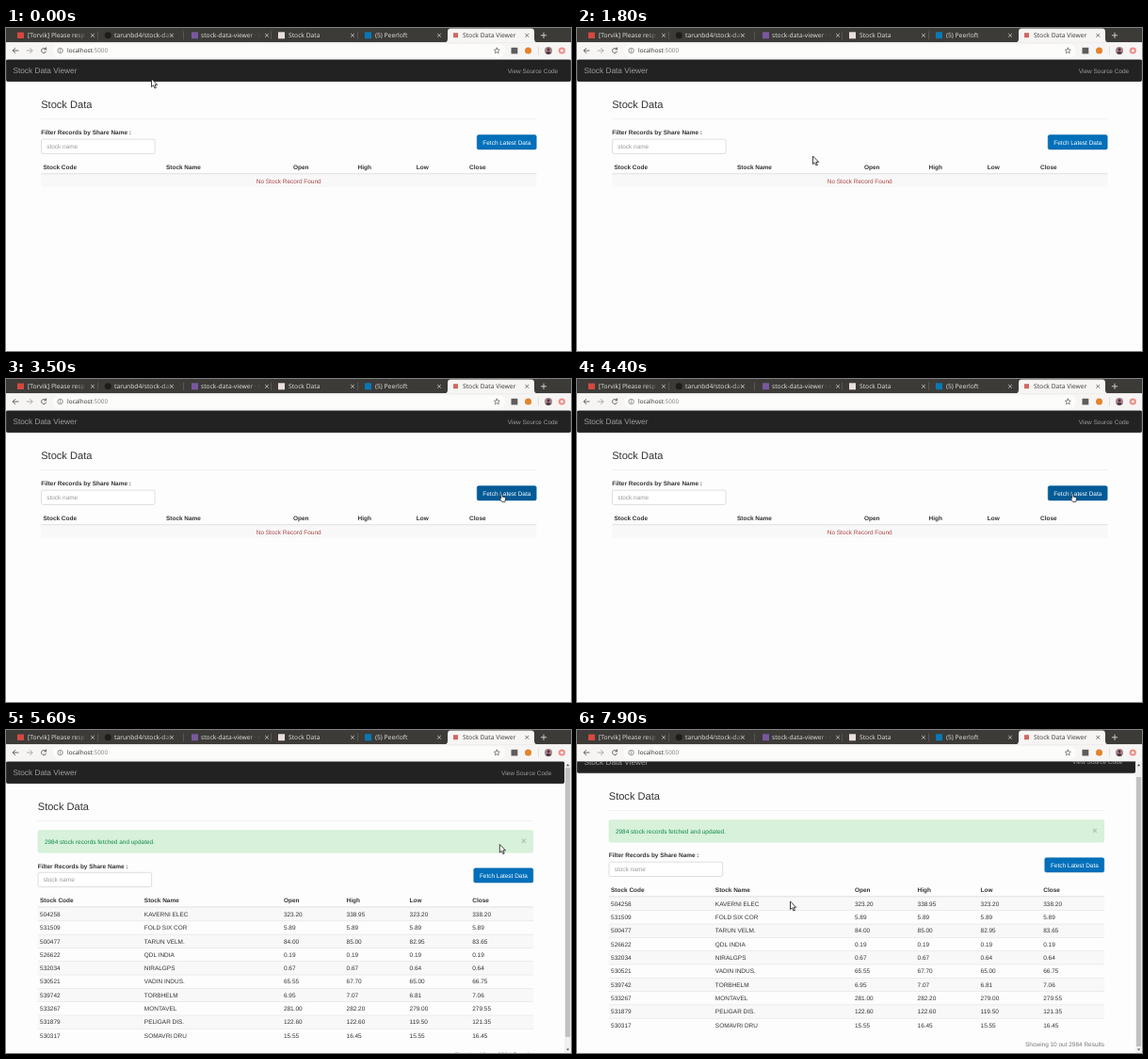
An HTML page for the animation above (8 s loop, 600x343 px).

```html
<!DOCTYPE html>
<html lang="en">
<head>
<meta charset="utf-8">
<title>Stock Data Viewer</title>
<style>
html, body { margin: 0; width: 100%; height: 100%; overflow: hidden; background: #fdfdfd; }
svg { display: block; width: 600px; height: 343px; }
text { font-family: "Liberation Sans", Arial, sans-serif; font-size: 6.46px; fill: #333; text-rendering: geometricPrecision; white-space: pre; }
.ui { font-family: "Noto Sans", "Open Sans", sans-serif; font-size: 6.7px; fill: #dcdad5; }
.b { font-weight: bold; }
.line { fill: none; stroke-linecap: round; stroke-linejoin: round; }
</style>
</head>
<body>
<svg id="stage" viewBox="0 0 600 343" xmlns="http://www.w3.org/2000/svg">
  <defs>
    <linearGradient id="fade"><stop offset="0" stop-color="#3c3b37" stop-opacity="0"/><stop offset="1" stop-color="#3c3b37"/></linearGradient>
    <clipPath id="view"><rect y="33.2" width="600" height="310"/></clipPath>
  </defs>
  <rect width="600" height="343" fill="#fdfdfd"/>
  <g clip-path="url(#view)">
    <g id="page">
      <g id="nav"></g>
      <g id="body">
        <g id="head"></g>
        <g id="alert"></g>
        <g id="main">
          <g id="form"></g>
          <g id="empty"></g>
          <g id="full"></g>
        </g>
      </g>
    </g>
    <g id="bar"></g>
  </g>
  <g id="chrome"></g>
  <g id="arrow"><path d="M0 0V8.6L2 6.8L3.5 10L4.9 9.4L3.5 6.3H6.2Z" fill="#fff" stroke="#111" stroke-width=".8" stroke-linejoin="round"/></g>
  <g id="hand"><path d="M1.4 .6Q2.2 -.2 2.8 .8V3.4L5.6 4Q6.4 4.3 6.3 5.2L5.6 8.8H2.3L.2 5.9Q-.1 5 .8 5L1.4 5.5Z" fill="#fff" stroke="#111" stroke-width=".7" stroke-linejoin="round"/></g>
</svg>
<script>
const $ = id => document.getElementById(id);
const text = (x, y, s, attrs = "") => `<text x="${x}" y="${y}" ${attrs}>${s}</text>`;
const rect = (x, y, w, h, fill, attrs = "") => `<rect x="${x}" y="${y}" width="${w}" height="${h}" fill="${fill}" ${attrs}/>`;
const dot = (x, y, r, fill) => `<circle cx="${x}" cy="${y}" r="${r}" fill="${fill}"/>`;
const line = (d, color, w = 1) => `<path class="line" d="${d}" stroke="${color}" stroke-width="${w}"/>`;
const cross = (x, y, r, color) => line(`M${x - r} ${y - r}l${2 * r} ${2 * r}m0 ${-2 * r}l${-2 * r} ${2 * r}`, color, .8);

const LEFT = 37.2, WIDTH = 526.2, ROW = 14.31, TOP = 155.3;
const ALERT_H = 33.2, SCROLL = 11.1, BAR_W = 6.9;

function drawChrome() {
  const tabs = [
    [23, "[Torvik] Please resp", 92, 97],
    [115, "tarunbd4/stock-data", 176, 188],
    [207, "stock-data-viewer · H", 277, 281],
    [300, "Stock Data", 368, 373],
    [392, "(5) Peerloft", 460, 0]
  ];
  let s = rect(0, 0, 600, 15.4, "#3c3b37") + rect(0, 15.2, 600, 18, "#f6f5f4");
  for (const [x, title, close, sep] of tabs) {
    s += text(x, 10.3, title, 'class="ui"');
    if (x < 300) s += rect(x + 50, 2, 13, 11, "url(#fade)") + rect(x + 63, 2, 18, 11, "#3c3b37");
    s += cross(close, 7.8, 1.6, "#d0cec9");
    if (sep) s += rect(sep, 3.5, .6, 8.5, "#6b6a65");
  }
  s += `<path d="M465 15.4Q469 15.4 469 11.5V4Q469 .6 472.4 .6H557.6Q561 .6 561 4V11.5Q561 15.4 565 15.4Z" fill="#f6f5f4"/>`;
  s += text(485, 10.3, "Stock Data Viewer", 'class="ui" style="fill:#45443f"') + cross(553.3, 7.8, 1.6, "#55544f");
  s += line("M568.3 7.8h5.4M571 5.1v5.4", "#dcdad5", .9);
  // Tab icons
  s += rect(12, 4.6, 7, 6.4, "#d5483f") + dot(108.3, 7.8, 3.5, "#1c1c1b") + rect(197, 4.3, 7, 7, "#79589f");
  s += rect(289, 4.3, 7, 7, "#e9dfdf") + rect(381, 4.3, 7, 7, "#0a78b5") + rect(475, 5.2, 5, 5, "#cf6760");
  // Toolbar
  s += rect(50, 17.2, 480, 14, "#fcfcfb", 'rx="7"');
  s += line("M13 24H7.4M9.8 21.4L7.2 24L9.8 26.6", "#55544f", .9);
  s += line("M22.3 24H27.9M25.5 21.4L28.1 24L25.5 26.6", "#a5a4a0", .9);
  s += line("M42.3 22.4A2.6 2.6 0 1 0 42.6 25M42.6 20.9V22.8H40.7", "#55544f", .9);
  s += `<circle cx="57.6" cy="24" r="2.7" fill="none" stroke="#66655f" stroke-width=".7"/>` + line("M57.6 23.8V25.3M57.6 22.5V22.6", "#66655f", .7);
  s += `<text class="ui" x="65" y="26.3" style="font-size:6.35px;fill:#333">localhost<tspan fill="#85847f">:5000</tspan></text>`;
  const star = Array.from({ length: 10 }, (_, i) => {
    const a = i * Math.PI / 5, r = i % 2 ? 1.5 : 3.1;
    return (521.3 + r * Math.sin(a)).toFixed(2) + " " + (24.2 - r * Math.cos(a)).toFixed(2);
  });
  s += line("M" + star.join("L") + "Z", "#55544f", .7);
  s += rect(536.5, 20.8, 6.8, 6.6, "#5d5d5d") + dot(554.5, 24, 3.5, "#e5822d") + rect(565.4, 19.5, .6, 9, "#d3d1cd");
  s += dot(576, 24, 4, "#a98288") + `<path d="M573 26.6Q576 22.8 579 26.6A4 4 0 0 1 573 26.6Z" fill="#4d3540"/>` + dot(576, 22.8, 1.5, "#4d3540");
  s += dot(590.3, 24, 3.6, "#ee8d88") + dot(590.3, 24, 1.6, "#fbeeee");
  $("chrome").innerHTML = s;
}

function drawHeader(cols) {
  const names = ["Stock Code", "Stock Name", "Open", "High", "Low", "Close"];
  return names.map((n, i) => text(cols[i], 150, n, 'class="b"')).join("") + rect(LEFT, 154.3, WIDTH, .95, "#ddd");
}

function drawPage() {
  $("nav").innerHTML = `<rect id="navbox" x=".2" y="33.4" height="23.3" rx="1.85" fill="#222" stroke="#080808" stroke-width=".5"/>`
    + text(7.4, 48, "Stock Data Viewer", 'style="font-size:8.31px;fill:#9d9d9d"')
    + text(586.2, 47.6, "View Source Code", 'id="link" text-anchor="end" style="fill:#9d9d9d"');
  $("head").innerHTML = text(LEFT, 85.2, "Stock Data", 'style="font-size:11.08px"') + rect(LEFT, 96.4, WIDTH, .6, "#e9e9e9");
  $("alert").innerHTML = rect(LEFT + .2, 106.6, WIDTH - .4, 23.7, "#d7f1da", 'rx="1.85" stroke="#cdebcf" stroke-width=".45"')
    + text(44.4, 120.8, "2984 stock records fetched and updated.", 'style="fill:#128a4a"')
    + text(553.4, 121.2, "×", 'class="b" text-anchor="middle" style="font-size:9.7px;fill:#abc3ae"');
  $("form").innerHTML = text(LEFT, 113.4, "Filter Records by Share Name :", 'class="b"')
    + rect(LEFT + .3, 118.1, 120.6, 15.3, "#fff", 'rx="1.85" stroke="#c8c8c8" stroke-width=".6"')
    + text(43.2, 128.2, "stock name", 'style="fill:#999"')
    + rect(500.2, 113.6, 63, 15.3, "#0270ba", 'id="btn" rx="1.7" stroke="#0263a5" stroke-width=".5"')
    + text(531.8, 123.5, "Fetch Latest Data", 'text-anchor="middle" style="fill:#fff"');

  $("empty").innerHTML = rect(LEFT, TOP, WIDTH, 13.9, "#f8f8f8") + drawHeader([39.5, 170, 305, 373.6, 435.8, 492])
    + text(300.2, 164.7, "No Stock Record Found", 'text-anchor="middle" style="fill:#a94442"');

  const cols = [39.5, 150.3, 298.4, 365, 432, 498.7];
  const rows = `504258|KAVERNI ELEC|323.20|338.95|323.20|338.20
531509|FOLD SIX COR|5.89|5.89|5.89|5.89
500477|TARUN VELM.|84.00|85.00|82.95|83.65
526622|QDL INDIA|0.19|0.19|0.19|0.19
532034|NIRALGPS|0.67|0.67|0.64|0.64
530521|VADIN INDUS.|65.55|67.70|65.00|66.75
539742|TORBHELM|6.95|7.07|6.81|7.06
533267|MONTAVEL|281.00|282.20|279.00|279.55
531879|PELIGAR DIS.|122.60|122.60|119.50|121.35
530317|SOMAVRI DRU|15.55|16.45|15.55|16.45`.split("\n");
  let s = "";
  rows.forEach((row, k) => {
    const y = TOP + k * ROW;
    if (k % 2 === 0) s += rect(LEFT, y, WIDTH, ROW, "#f8f8f8");
    if (k) s += rect(LEFT, y - .25, WIDTH, .5, "#ddd");
    row.split("|").forEach((cell, i) => s += text(cols[i], (y + 9.4).toFixed(2), cell));
  });
  $("full").innerHTML = s + drawHeader(cols)
    + text(LEFT + WIDTH, 314.2, "Showing 10 out 2984 Results", 'text-anchor="end" style="fill:#777"');

  $("bar").innerHTML = rect(600 - BAR_W, 33.2, BAR_W, 310, "#f0f0f0")
    + `<path d="M594.9 38.2L596.6 36L598.3 38.2ZM594.9 338.4L596.6 340.6L598.3 338.4Z" fill="#555"/>`
    + rect(594, 40, 5.1, 286, "#c1c1c1", 'id="thumb"');
}

// Pointer stops: time, x, y
const path = [
  [0, 154.5, 54], [900, 158, 108], [1800, 250.5, 136], [2100, 246, 152], [2400, 295, 174],
  [2700, 327, 156], [3400, 524.3, 121.6], [5700, 524.3, 121.6], [6400, 480.2, 173.6],
  [6700, 468, 184], [7500, 258, 196], [7900, 226.5, 182], [8000, 226.5, 182]
];
const clamp = v => Math.max(0, Math.min(1, v));
const ease = v => v * v * (3 - 2 * v);
function pointer(t) {
  const i = path.findIndex((p, k) => k && t <= p[0]);
  const [t0, x0, y0] = path[i - 1], [t1, x1, y1] = path[i];
  const k = ease((t - t0) / (t1 - t0));
  return [x0 + (x1 - x0) * k, y0 + (y1 - y0) * k];
}

const move = (id, x, y) => $(id).setAttribute("transform", `translate(${x} ${y})`);
const show = (id, on) => $(id).setAttribute("display", on ? "inline" : "none");

function render(ms) {
  const t = Math.floor(ms % 8000 / 100) * 100;
  const updated = t >= 4900, loaded = t >= 5200, hover = t >= 3300 && !updated;
  const scroll = SCROLL * ease(clamp((t - 5900) / 300));
  const gap = loaded ? BAR_W : 0;

  move("page", 0, -scroll);
  move("body", -gap / 2, 0);
  move("link", -gap, 0);
  move("main", 0, updated ? ALERT_H : 0);
  $("navbox").setAttribute("width", 599.6 - gap);
  show("alert", updated);
  show("empty", !loaded);
  show("full", loaded);
  show("bar", loaded);
  $("thumb").setAttribute("y", 40 + scroll * .9);
  $("btn").setAttribute("fill", hover ? "#025a96" : "#0270ba");

  const [x, y] = pointer(t);
  show("arrow", !hover);
  show("hand", hover);
  move("arrow", x, y);
  move("hand", x, y);
}

drawChrome();
drawPage();
render(0);
const start = performance.now();
(function tick() {
  render(performance.now() - start);
  requestAnimationFrame(tick);
})();
</script>
</body>
</html>
```
